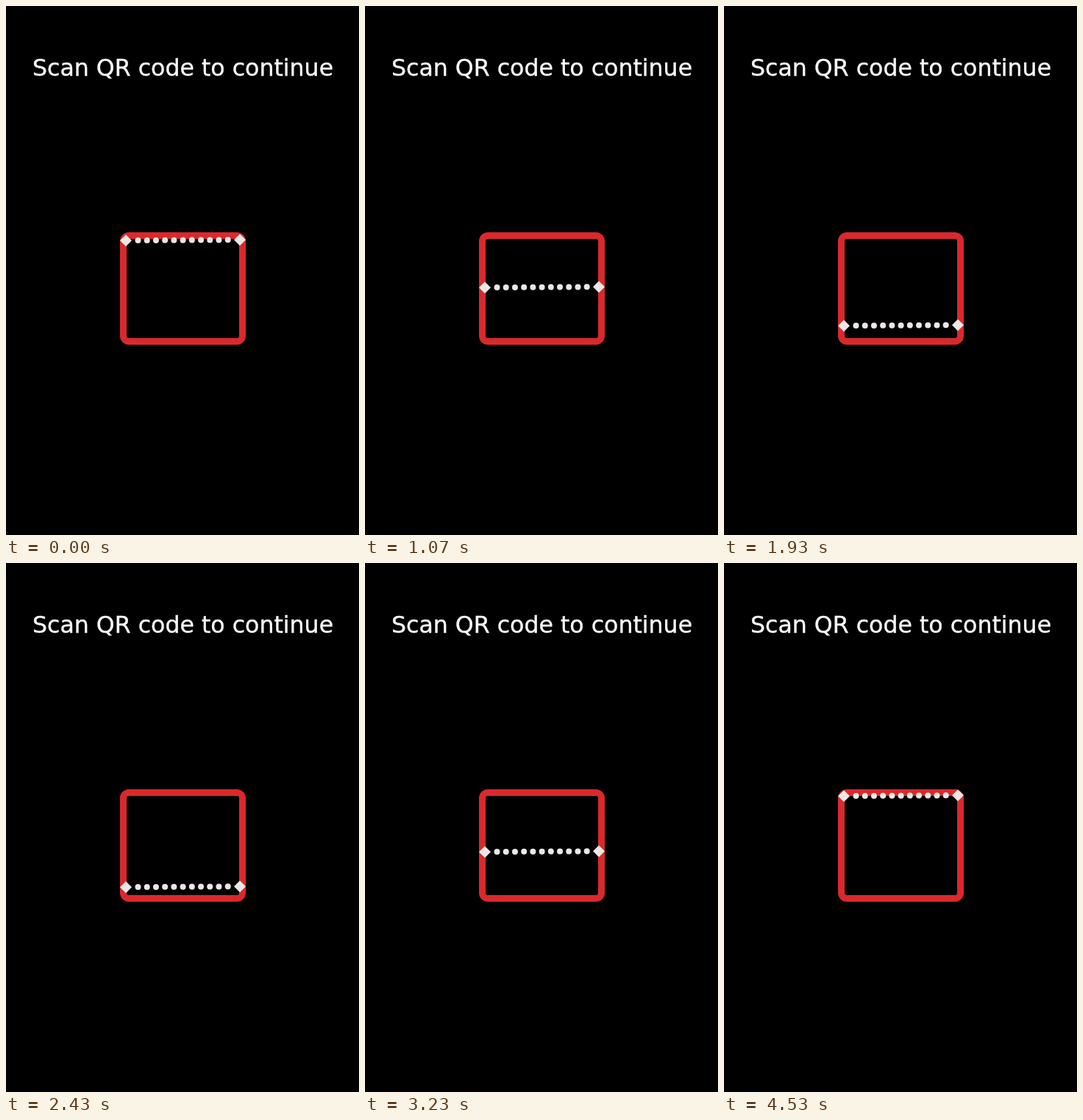
An HTML page for the animation above (4.56 s loop, 480x720 px).

```html
<!DOCTYPE html>
<html lang="en">
<head>
<meta charset="utf-8">
<title>Scan QR code</title>
<style>
  html, body { margin: 0; width: 100%; height: 100%; overflow: hidden; background: #000; }
  svg { display: block; width: 100vw; height: 100vh; }
  text { font: 31.6px "DejaVu Sans", sans-serif; fill: #fafafa; stroke: #fafafa; stroke-width: .4; }
  #box { fill: none; stroke: #da292c; stroke-width: 9; }
  #beam { fill: #ece7e6; }
</style>
</head>
<body>
<svg viewBox="0 0 480 720">
  <text x="36" y="94.5">Scan QR code to continue</text>
  <rect id="box" x="159.5" y="312.5" width="162" height="144" rx="7.5"/>
  <g id="beam"></g>
</svg>
<script>
const LOOP = 4560, FRAMES = 137, STEP = 100 / 3;
const TOP = 315.2, SPEED = 2, LEAD = 1.5;
const LEFT = 163, RIGHT = 318, TILT = 1, DOTS = 11;

const beam = document.getElementById('beam');

function add(tag, attrs) {
  const el = document.createElementNS('http://www.w3.org/2000/svg', tag);
  for (const key in attrs) el.setAttribute(key, attrs[key]);
  beam.append(el);
}

const tiltAt = x => TILT * (RIGHT - x) / (RIGHT - LEFT);

for (const x of [LEFT, RIGHT]) {
  add('path', { d: `M${x} ${tiltAt(x) - 8}l8 8l-8 8l-8 -8z` });
}
for (let i = 0; i < DOTS; i++) {
  const x = 179.5 + i * 12.22;
  add('circle', { cx: x, cy: tiltAt(x), r: 4 });
}

// Triangle wave: down and back up at constant speed, sampled at 30 steps per second.
function beamY(t) {
  const tick = Math.floor((Math.floor(t / 10) * 10 + 5) / STEP);
  const phase = (tick + LEAD) % FRAMES;
  return TOP + SPEED * Math.min(phase, FRAMES - phase);
}

const start = performance.now();
function draw() {
  const t = (performance.now() - start) % LOOP;
  beam.setAttribute('transform', `translate(0 ${beamY(t)})`);
  requestAnimationFrame(draw);
}
draw();
</script>
</body>
</html>
```
